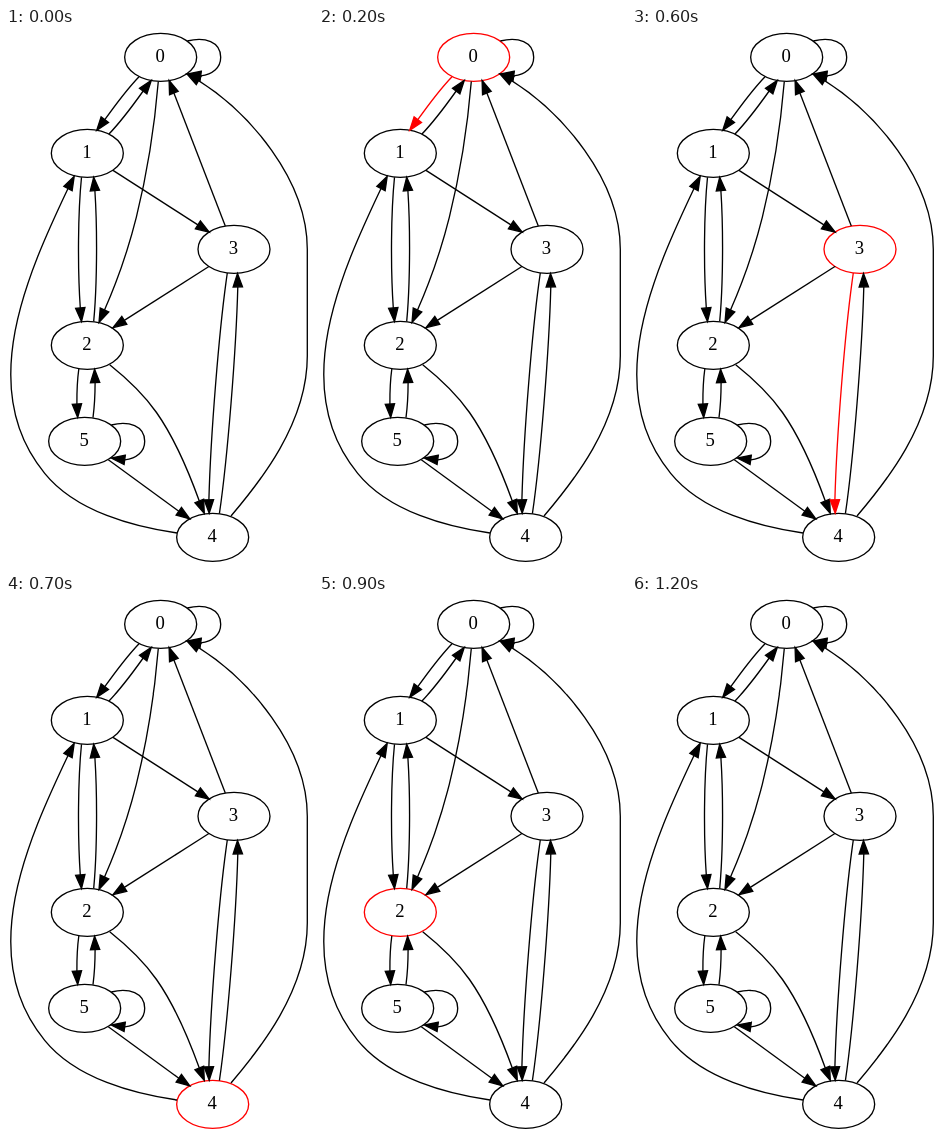
These frames come from a looping animation (307 px wide and 539 px high, 1.3 s). An HTML page:

```html
<!DOCTYPE html>
<html lang="en">
<head>
<meta charset="utf-8">
<title>Depth-first walk</title>
<style>
  html, body { margin: 0; width: 100%; height: 100%; overflow: hidden; background: #fff; }
  svg { display: block; }
  ellipse, path { fill: none; stroke: #000; stroke-width: 1.333; }
  polygon { fill: #000; stroke: #000; stroke-width: 1.333; }
  text { font: 18.667px "Liberation Serif", "Times New Roman", serif; text-anchor: middle; }
  .on ellipse, .on path, .on polygon { stroke: red; }
  .on polygon { fill: red; }
  .dim { background: #505050; }
  .dim .on ellipse { stroke: #303030; }
</style>
</head>
<body>
<svg id="stage" width="307" height="539" viewBox="0 0 307 539"></svg>
<script>
const stage = document.getElementById('stage');
const parts = {};

function add(parent, tag, attrs) {
  const el = document.createElementNS('http://www.w3.org/2000/svg', tag);
  for (const key in attrs) el.setAttribute(key, attrs[key]);
  return parent.appendChild(el);
}

function node(name, x, y) {
  const g = parts[name] = add(stage, 'g');
  add(g, 'ellipse', { cx: x, cy: y, rx: 36, ry: 24 });
  add(g, 'text', { x: x - 0.5, y: y + 4.67 }).textContent = name;
}

// The curve runs to the base of the arrowhead; the head goes on to the tip.
function edge(name, start, curve, [bx, by], [tx, ty]) {
  const g = parts[name] = add(stage, 'g');
  const len = Math.hypot(tx - bx, ty - by);
  const nx = (by - ty) / len * 4.667, ny = (tx - bx) / len * 4.667;
  add(g, 'path', { d: `M${start} ${curve} ${bx},${by}` });
  add(g, 'polygon', { points: `${bx + nx},${by + ny} ${tx},${ty} ${bx - nx},${by - ny}` });
}

node('0', 154.67, 29.33);
node('1', 81.33, 125.33);
node('2', 81.33, 317.33);
node('3', 228, 221.33);
node('4', 206.67, 509.33);
node('5', 78.67, 413.33);

edge('00', '181.3,13', 'C199,8.5 214.7,13.8 214.7,29.3 C214.7,40 206.5,46.5', [194.7, 47.9], [181.3, 46.1]);
edge('01', '133,48.7', 'C122.5,59.7 109.5,76.7', [98.8, 91.7], [90.7, 102.3]);
edge('02', '152.3,53.5', 'C149.5,87 142.3,141 130.3,189.3 C122.3,221 110,256', [98.5, 282], [93, 294.3]);
edge('10', '103,106', 'C113.5,95 126.5,78', [137.2, 63], [145.3, 52.4]);
edge('12', '75.5,149.3', 'C72,184 71.5,240', [74.3, 280], [75.5, 293.4]);
edge('13', '107,142.4', 'L', [191.9, 196.9], [203.2, 204.1]);
edge('21', '87.7,293.4', 'C91,258.7 91.5,202.7', [88.9, 162.7], [87.7, 149.3]);
edge('24', '103.7,336.7', 'C119.5,349.3 138,366.5 150.5,384.5 C168.5,410 183.5,446', [193.3, 473], [198.3, 485.4]);
edge('25', '72.8,341', 'C71.3,352 70.8,364', [70.9, 376], [71.7, 389.4]);
edge('30', '219.3,198', 'L', [167.9, 65], [163.1, 52.5]);
edge('32', '203.3,238.3', 'L', [118.3, 292.4], [107, 299.6]);
edge('34', '221.3,245', 'C213.1,301 204.6,408', [202.9, 471.8], [203.2, 485.2]);
edge('40', '225,488', 'C253,455 301.3,396 301.3,328 L301.3,221.3 C301.3,151 242.5,84', [192.6, 52.6], [181, 46]);
edge('41', '171,505', 'C129,499 70,484 38.7,445.3 C-31.2,361 22,245', [62, 160.5], [68.2, 148.4]);
edge('43', '213.4,485.7', 'C221.6,429.7 230.1,322.7', [231.8, 258.9], [231.5, 245.5]);
edge('52', '87,389.7', 'C88.4,379 89.1,366', [89.1, 354.6], [88.6, 341.2]);
edge('54', '102.3,431.7', 'L', [172.8, 483.2], [183.8, 490.9]);
edge('55', '105.3,397', 'C123,392.5 138.7,398 138.7,413.3 C138.7,424 130.5,430.5', [118.7, 431.9], [105.3, 430.1]);

// Parts lit at each step: a visited node, then the node with the edge it follows.
const steps = [[], ['0'], ['0', '01'], ['1'], ['1', '13'], ['3'], ['3', '34'],
  ['4'], ['3', '32'], ['2'], ['2', '25'], ['5'], []];

const begin = performance.now();
function draw() {
  const step = Math.floor((performance.now() - begin) / 100) % steps.length;
  stage.classList.toggle('dim', step === 1);
  for (const name in parts) parts[name].classList.toggle('on', steps[step].includes(name));
  requestAnimationFrame(draw);
}
draw();
</script>
</body>
</html>
```
